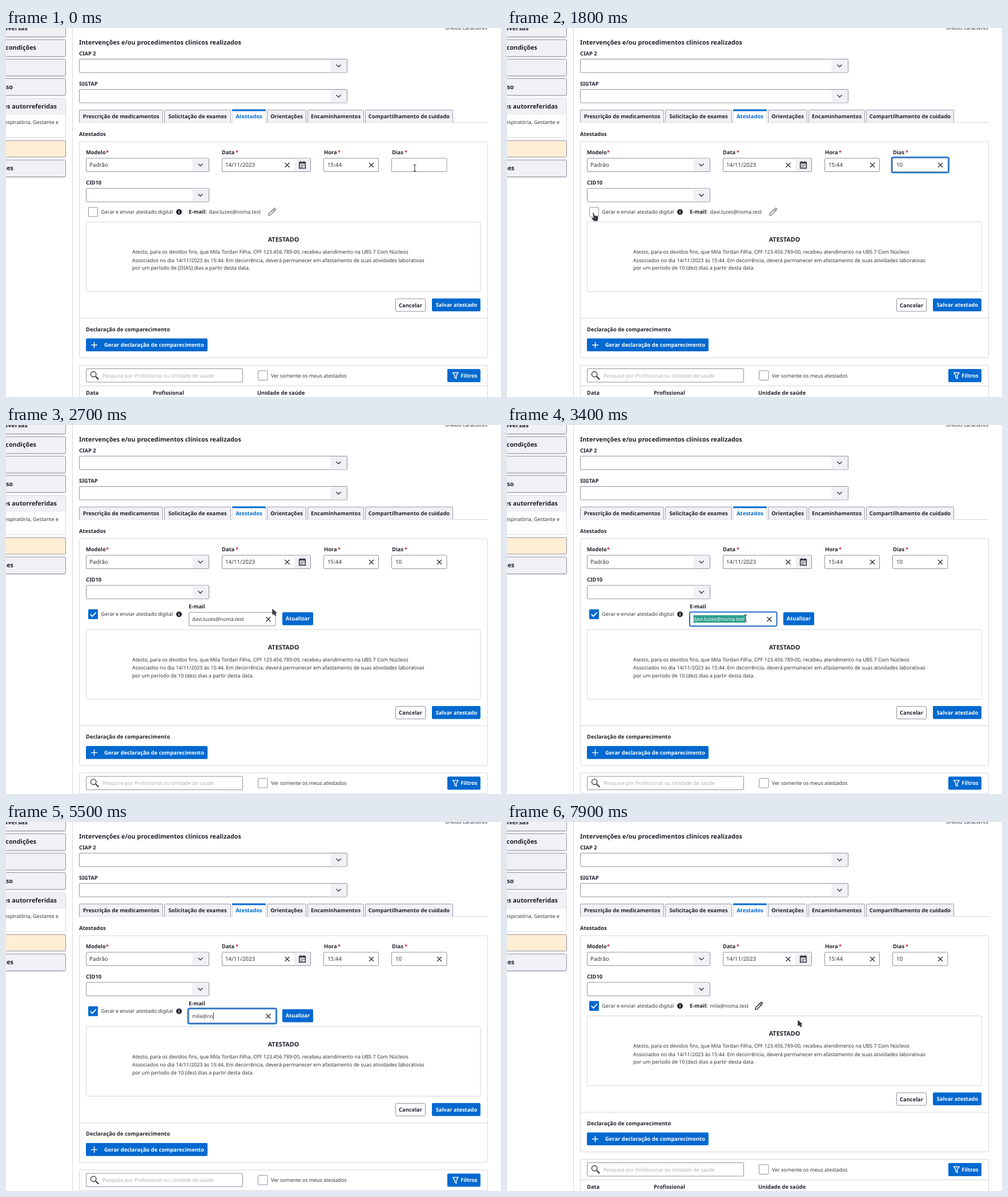
An HTML page for the animation above (8000 ms loop, 867x646 px).

```html
<!DOCTYPE html>
<html lang="pt-BR">
<head>
<meta charset="utf-8">
<title>Atestados</title>
<style>
html,body{margin:0;width:100%;height:100%;overflow:hidden;background:#fff}
svg{display:block;width:100vw;height:100vh}
text{font:8.85px "Noto Sans",sans-serif;fill:#33333f;text-rendering:geometricPrecision;white-space:pre}
.b{font-size:9.35px;font-weight:700;fill:#20202c}
.h{font-size:10.85px;font-weight:700;fill:#20202c}
.d{font-size:9.8px}
.p{fill:#adadb9}
.w{fill:#fff}
.a{fill:#0069d0}
.r{fill:#c9252d}
.mid{text-anchor:middle}
.end{text-anchor:end}
.box{fill:#fff;stroke:#8f8f9f}
.tab{fill:#f0f0f5;stroke:#9d9dac}
.side{fill:#f0f0f5;stroke:#8f8f9f}
.card{fill:none;stroke:#d6d6e0}
.grey{fill:#f0f0f5}
.blue{fill:#0069d0}
.ring{fill:none;stroke:#0063cc}
.ico{fill:none;stroke:#292935;stroke-width:1.3}
.wi{fill:none;stroke:#fff;stroke-width:1.4}
</style>
</head>
<body>
<svg id="stage" viewBox="0 0 867 646" preserveAspectRatio="none"></svg>
<script>
const OLD_MAIL = 'davi.luzes@noma.test', NEW_MAIL = 'mila@noma.test';
const LOOP = 8000, TICK = 100, EDIT_ON = 2600, EDIT_OFF = 7700, CHECKED = 2000;
const SHIFT = 18.6;

const rect = (x, y, x2, y2, cls, rx = 1.5, extra = '') =>
  `<rect x="${x}" y="${y}" width="${x2 - x}" height="${y2 - y}" rx="${rx}" class="${cls}" ${extra}/>`;
// y is the middle of the lowercase line
const text = (x, y, s, cls = '', id = '') =>
  `<text x="${x}" y="${y + 3.2}" class="${cls}" id="${id}">${s}</text>`;
const path = (d, cls = 'ico', extra = '') => `<path d="${d}" class="${cls}" ${extra}/>`;
const group = (id, body) => `<g id="${id}">${body}</g>`;
const clear = (x, y) => path(`M${x - 4} ${y - 4}l8 8m0-8l-8 8`);
const label = (x, y, s, starX) => text(x, y, s, 'b') + (starX ? text(starX, y, '*', 'b r') : '');
const select = (x, y, x2) => rect(x, y, x2, y + 23.5, 'box') +
  rect(x2 - 29, y + .5, x2 - .5, y + 23, 'grey') +
  path(`M${x2 - 19} ${y + 9.7}l4 4 4-4`, 'ico', 'stroke-width="1.6"');
const button = (x, y, x2, s, tx) => rect(x, y, x2, y + 22.6, 'blue', 2) + text(tx, y + 11.4, s, 'b w mid');
const pencil = id => group(id, path('M-6.3 6.3l1-3.6 8-8 2.7 2.7-8 8zM1-3.6l2.7 2.7M3.6-6.1l1-.7 2.2 2.2-.8 1', 'ico', 'stroke-width="1.1"'));

const sidebar = path('M116.5 0V646', 'card') +
  [[-12, 15.6], [20.5, 50], [54.5, 84], [88.5, 118], [231, 260.5]].map(([a, b]) =>
    rect(-9, a, 104.5, b, 'side', 2) + path(`M0 ${b + .6}H103`, 'ico', 'style="stroke:#aaaab7;stroke-width:.7"')).join('') +
  rect(-9, 123.5, 104.5, 191.5, 'card', 2) + rect(-9, 124, 104, 152, 'grey') +
  rect(-9, 197, 104.5, 226, 'side', 2, 'style="fill:#ffedd5"') +
  [[38, 1, 'dversas'], [53, 35, 'condições'], [12, 104, 'so'], [89, 138, 'es autorreferidas'], [13, 246, 'nes']]
    .map(([x, y, s]) => text(x, y, s, 'h end')).join('') +
  text(92, 164.5, 'espiratória, Gestante e', 'end');

const tabs = path('M128 165.5H844', 'card') + [
  [128.5, 274.5, 'Prescrição de medicamentos'], [277.5, 393.5, 'Solicitação de exames'],
  [396.5, 454.5, 'Atestados'], [457.5, 525.5, 'Orientações'],
  [528.5, 626.5, 'Encaminhamentos'], [629.5, 782.5, 'Compartilhamento de cuidado']
].map(([x, x2, s], i) => {
  const mid = (x + x2) / 2;
  return i === 2
    ? rect(x, 144, x2, 165.5, 'card') + rect(x + .5, 164, x2 - .5, 167, 'w', 0) +
      rect(x - .5, 142.6, x2 + .5, 145.6, 'blue', 1) + text(mid, 155, s, 'b a mid')
    : path(`M${x} 165.5V145q0-1.5 1.5-1.5H${x2 - 1.5}q1.5 0 1.5 1.5V165.5`, 'tab') + text(mid, 155, s, 'b mid');
}).join('');

const form = text(843, -.2, '0/4000 caracteres', 'end') +
  text(128, 26, 'Intervenções e/ou procedimentos clínicos realizados', 'h') +
  label(128, 44.5, 'CIAP 2') + select(128.5, 54.5, 597.5) +
  label(128, 97.5, 'SIGTAP') + select(128.5, 107.5, 597.5) + tabs +
  label(128, 185.5, 'Atestados') +
  label(140, 218, 'Modelo', 175) + select(140.5, 228, 355.5) + text(146, 240, 'Padrão', 'd') +
  label(378, 218, 'Data', 402) + rect(378.5, 228, 533.5, 251.5, 'box') + rect(505, 228.5, 533, 251, 'grey') +
  text(384, 240, '14/11/2023', 'd') + clear(492.5, 240) +
  path('M513.7 235.2h10.6v10.4h-10.6zM513.7 236.6h10.6M516.3 233v2.5M521.7 233v2.5', 'ico', 'style="stroke-width:1.5"') +
  path('M515.8 240h1.6m.9 0h1.6m.9 0h1.6M515.8 243h1.6m.9 0h1.6') +
  label(557, 218, 'Hora', 581) + rect(556.5, 228, 652.5, 251.5, 'box') + text(563, 240, '15:44', 'd') + clear(640, 240) +
  label(676, 218, 'Dias', 698) + rect(675.5, 228, 772, 251.5, 'box') +
  text(682, 240, '', 'd', 'days') + group('daysClear', clear(759, 240)) +
  rect(0, 0, 1, 1, 'ring', 3, 'id="daysRing"') +
  label(140, 271, 'CID10') + select(140.5, 280.8, 355.5);

const checkRow = rect(144.5, 314, 160.5, 330, 'box', 1) +
  group('tick', rect(144, 313.5, 161, 330.5, 'blue', 1.5) + path('M147.8 322l3.4 3.6 6.4-6.8', 'wi', 'style="stroke-width:1.8"')) +
  rect(141.8, 311.3, 163.2, 332.7, 'ring', 3, 'id="checkRing" stroke-width="1.6"') +
  text(166.5, 322, 'Gerar e enviar atestado digital') +
  '<circle cx="303" cy="322" r="4.9" fill="#20202c"/>' + path('M303 321v3.6M303 318.8v1.2', 'wi');

const mailView = text(320, 322, 'E-mail:', 'b') + text(355.5, 322, '', '', 'mail') + pencil('pen');

const mailEdit = label(320, 318, 'E-mail') + rect(320.5, 328, 472, 351.5, 'box') +
  rect(0, 0, 1, 1, 'ring', 3, 'id="mailRing"') +
  rect(326.5, 333, 420, 346, '', 0, 'id="selection" fill="#2fa08c"') +
  text(326, 340, '', '', 'typed') + clear(459.5, 340) + button(484, 327.8, 538, 'Atualizar', 511);

const lower = rect(140.5, 339.5, 831, 461.5, 'card') + text(486, 371, 'ATESTADO', 'h mid') +
  text(221, 392.2, 'Atesto, para os devidos fins, que Mila Tordan Filha, CPF 123.456.789-00, recebeu atendimento na UBS 7 Com Núcleos') +
  text(221, 406.4, 'Associados no dia 14/11/2023 às 15:44. Em decorrência, deverá permanecer em afastamento de suas atividades laborativas') +
  text(221, 420.2, '', '', 'period') +
  rect(682.5, 474, 734.5, 496, 'box', 2) + text(708.5, 485.3, 'Cancelar', 'b mid') +
  button(746, 473.5, 831, 'Salvar atestado', 789) +
  path('M128 508H844', 'card') + text(140, 527.5, 'Declaração de comparecimento', 'b') +
  button(140, 543.5, 353, 'Gerar declaração de comparecimento', 259.5) + path('M149 555h11m-5.5-5.5v11', 'wi') +
  rect(128.5, 590.5, 843.5, 700, 'card') + rect(140.5, 596.5, 414.5, 620, 'box') +
  path('M157 610l5.2 5.2', 'ico', 'style="stroke-width:2"') + '<circle cx="153.2" cy="606.2" r="4.7" class="ico"/>' +
  text(169, 608.5, 'Pesquise por Profissional ou Unidade de saúde', 'p') +
  rect(441.5, 600, 458, 616.5, 'box', 1) + text(464, 608.5, 'Ver somente os meus atestados') +
  rect(773, 597, 831, 620, 'blue', 2) + text(811, 608.5, 'Filtros', 'b w mid') +
  path('M782.8 603.5h9.2l-3.2 5v5.2l-2.8-1.6v-3.6z', 'wi') +
  path('M128 626.5H844', 'card') +
  text(140, 639, 'Data', 'b') + text(257, 639, 'Profissional', 'b') + text(440, 639, 'Unidade de saúde', 'b');

const dark = 'style="fill:#383842;stroke:#fff;stroke-width:.6"';
const pointers = group('arrow', path('M0 0V11.7L2.8 10.2 5.3 13.6 8 12.2 6.3 8.9 9.2 8Z', '', dark)) +
  group('hand', path('M0 1.2Q0 0 1 0T2.4 1.3L3.4 5.2 8.2 5.8Q9.8 6.2 9.8 8V12.2L8.4 15.2H2L-2 10.2Q-2.4 8.6-.8 8.6L1.3 9.5Z', '', dark)) +
  group('beam', path('M-2.5-6Q0-6 0-4.4 0-6 2.5-6M0-4.8V4.8M-2.5 6Q0 6 0 4.4 0 6 2.5 6', 'ico', 'style="stroke-width:1"'));

document.getElementById('stage').innerHTML = '<rect width="867" height="646" fill="#fff"/>' + sidebar +
  rect(128.5, 199, 843.5, 577.5, 'card', 2, 'id="panel"') + form +
  group('checkRow', checkRow) + group('mailView', mailView) + group('mailEdit', mailEdit) + group('lower', lower) +
  rect(0, 0, .9, 12.5, '', 0, 'id="caret" fill="#20202c"') + pointers;

const $ = Object.fromEntries([...document.querySelectorAll('[id]')].filter(e => e.id).map(e => [e.id, e]));
const show = (el, on) => el.style.display = on ? '' : 'none';
const move = (el, x, y) => el.setAttribute('transform', `translate(${x} ${y})`);
const ramp = (t, from, length) => Math.max(0, Math.min(1, (t - from) / length));

// [time, number of characters typed]
const KEYS = [[4100, 1], [4700, 2], [4800, 3], [4900, 4], [5200, 5], [5400, 6], [5500, 7], [5600, 8],
  [5900, 9], [6000, 10], [6200, 11], [6300, 13], [6400, 14]];
// [time, x, y, pointer]
const MOVES = [[0, 716, 245, 'beam'], [800, 716, 245, ''], [1400, 700, 236, 'arrow'], [1500, 600, 211, 'arrow'],
  [1600, 420, 232, 'arrow'], [1700, 230, 295, 'arrow'], [1800, 150, 323, 'hand'], [2200, 151, 325, 'hand'],
  [2300, 205, 312, 'arrow'], [2400, 370, 286, 'arrow'], [2500, 463, 317, 'hand'], [2600, 466, 321, 'hand'],
  [2700, 466, 321, 'arrow'], [2800, 455, 332, 'beam'], [3000, 418, 338, 'beam'], [4100, 418, 338, ''],
  [7200, 478, 357, 'arrow'], [7400, 502, 347, 'hand'], [7500, 509, 344, 'hand'], [7700, 509, 346, 'arrow'], [8000, 509, 346, 'arrow']];

function focusRing(el, x, y, x2, y2, k) {
  const grow = k * 1.8, attrs = {x: x - grow, y: y - grow, width: x2 - x + 2 * grow, height: y2 - y + 2 * grow};
  for (const name in attrs) el.setAttribute(name, attrs[name]);
  el.setAttribute('stroke-width', 1.2 + .8 * k);
  show(el, k > 0);
}

function placePointer(t) {
  const i = MOVES.findLastIndex(m => m[0] <= t);
  const [t0, x, y, kind] = MOVES[i], [t1, x1, y1] = MOVES[i + 1];
  const k = (t - t0) / (t1 - t0);
  for (const name of ['arrow', 'hand', 'beam']) show($[name], name === kind);
  if (kind) move($[kind], x + (x1 - x) * k, y + (y1 - y) * k);
}

function placeCaret(field, y, on) {
  show($.caret, on);
  if (on) move($.caret, +field.getAttribute('x') + field.getComputedTextLength() + .3, y);
}

function render(t) {
  const edit = t >= EDIT_ON && t < EDIT_OFF, checked = t >= CHECKED;
  const key = KEYS.findLast(k => k[0] <= t);
  const dy = edit ? SHIFT : 0;
  move($.lower, 0, dy);
  move($.checkRow, 0, dy / 2);
  $.panel.setAttribute('height', 378.5 + dy);

  $.days.textContent = t < 800 ? '' : t < 1000 ? '1' : '10';
  show($.daysClear, t >= 800);
  const days = t < 800 ? '[DIAS]' : t < 1000 ? '1 (um)' : '10 (dez)';
  $.period.textContent = `por um período de ${days} ${days === '1 (um)' ? 'dia' : 'dias'} a partir desta data.`;
  focusRing($.daysRing, 675.5, 228, 772, 251.5, t < CHECKED ? ramp(t, 100, 300) : 0);

  show($.tick, checked);
  show($.checkRing, checked && t < EDIT_ON);
  show($.mailView, !edit);
  show($.mailEdit, edit);
  $.mail.textContent = t < EDIT_OFF ? OLD_MAIL : NEW_MAIL;
  move($.pen, t < EDIT_OFF ? 466 : 441, 322);
  $.pen.style.opacity = checked ? 1 : .6;

  const selected = t >= 3400 && t < 4100;
  $.typed.textContent = key ? NEW_MAIL.slice(0, key[1]) : OLD_MAIL;
  $.typed.setAttribute('class', selected ? 'w' : '');
  show($.selection, selected);
  if (selected) $.selection.setAttribute('width', $.typed.getComputedTextLength() + .5);
  focusRing($.mailRing, 320.5, 328, 472, 351.5, ramp(t, 3200, 500));

  if (edit) placeCaret($.typed, 333.5, !!key && t - key[0] < (key[1] === 1 ? 300 : 400));
  else placeCaret($.days, 233.5, t >= 200 && t < 1400);
  placePointer(t);
}

function frame(now) {
  render(Math.floor(now % LOOP / TICK) * TICK);
  requestAnimationFrame(frame);
}
const start = performance.now();
render(0);
requestAnimationFrame(function tick(now) {
  render(Math.floor(Math.max(0, now - start) % LOOP / TICK) * TICK);
  requestAnimationFrame(tick);
});
</script>
</body>
</html>
```
